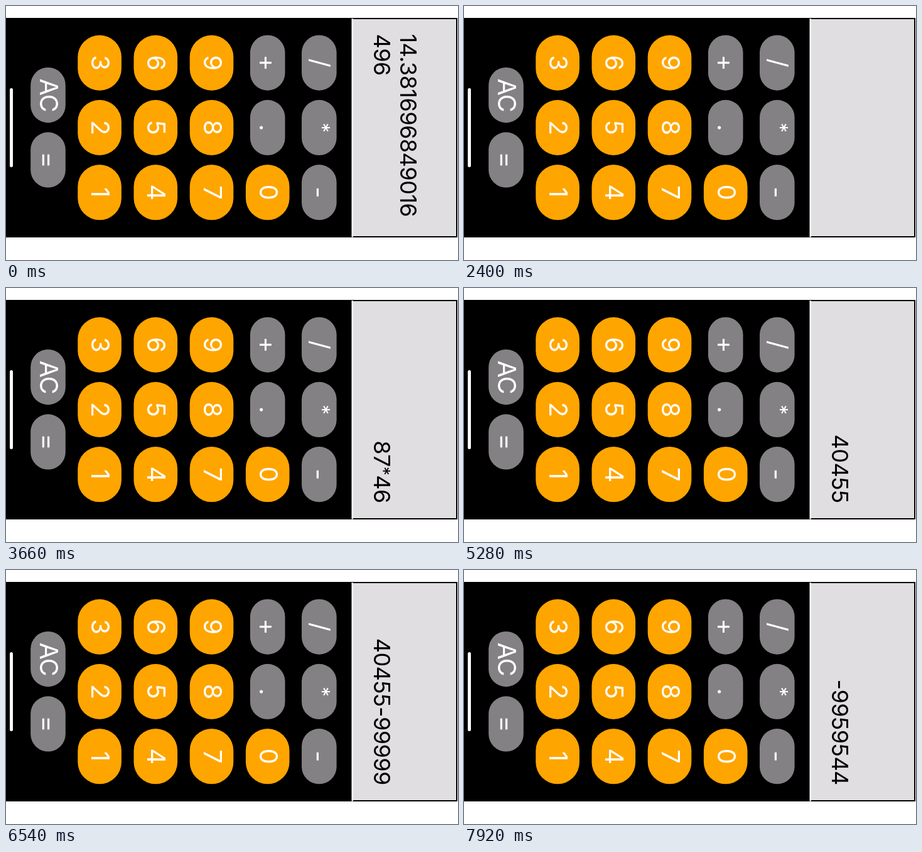
Animation of 720 by 405 pixels, one loop 8 s. Source, as an HTML page:

```html
<!DOCTYPE html>
<html lang="en">
<head>
<meta charset="utf-8">
<title>Calculator</title>
<style>
  html, body { margin: 0; width: 100%; height: 100%; overflow: hidden; background: #fff; }
  svg { display: block; width: 720px; height: 405px; }
  text { font-family: Inter, "Liberation Sans", sans-serif; white-space: pre; }
  #keys text { font-size: 40px; fill: #fff; text-anchor: middle; }
  #screen { font-size: 36px; letter-spacing: -0.55px; fill: #000; }
</style>
</head>
<body>
<svg viewBox="0 0 720 405">
  <rect y="19" width="719" height="350"/>
  <rect x="550.5" y="20" width="2.5" height="348.5" fill="#fff"/>
  <rect x="553" y="21" width="164" height="346" fill="#e0dee1"/>
  <rect x="6" y="131" width="5" height="126" rx="2.5" fill="#fff"/>
  <g id="keys"></g>
  <g id="screen"></g>
</svg>
<script>
const LOOP = 8000;
const ORANGE = { fill: '#ffa500', width: 69.6 };
const GRAY = { fill: '#848184', width: 55.6 };

// Each row of keys: centre x, style, top of the first key, labels from top to bottom
const rows = [
  [67, GRAY, 98, 'AC', '='],
  [149.1, ORANGE, 46.5, '3', '2', '1'],
  [238.3, ORANGE, 46.5, '6', '5', '4'],
  [327.5, ORANGE, 46.5, '9', '8', '7'],
  [416.7, GRAY, 46.5, '+', '.'],
  [416.7, ORANGE, 253.1, '0'],
  [498.8, GRAY, 46.5, '/', '*', '-'],
];

const KEY_HEIGHT = 88.2, KEY_STEP = 103.3;

function key(cx, { fill, width }, y, label) {
  const star = label === '*';
  const base = cx - 13 + (star ? 6 : '+-='.includes(label) ? -2 : 0);
  const style = star ? 'font-size:32px' : label === 'AC' ? 'letter-spacing:-1px' : '';
  return `<rect x="${cx - width / 2}" y="${y}" width="${width}" height="${KEY_HEIGHT}" rx="${width / 2}" fill="${fill}"/>
    <text transform="translate(${base} ${y + KEY_HEIGHT / 2}) rotate(90)" style="${style}">${label}</text>`;
}

document.getElementById('keys').innerHTML = rows.map(([cx, style, top, ...labels]) =>
  labels.map((label, i) => key(cx, style, top + i * KEY_STEP, label)).join('')).join('');

// What the display reads from each time on
const steps = [
  [0, '14.381696849016\n496'],
  [1860, ''],
  [2820, '8'], [3030, '87'], [3210, '87*'], [3390, '87*4'], [3570, '87*46'], [3870, '87*465'],
  [4500, '40455'], [5340, '40455-'],
];
for (let n = 1; n <= 7; n++) steps.push([5760 + n * 150, '40455-' + '9'.repeat(n)]);
steps.push([7230, '-9959544']);

const line = (x, y, anchor, text) =>
  `<text transform="translate(${x} ${y}) rotate(90)" text-anchor="${anchor}">${text}</text>`;

// The asterisk is smaller and raised
const raiseStar = text => text.replace(/\*(.*)/,
  '<tspan font-size="28" dy="-5.8">*</tspan><tspan dy="5.8">$1</tspan>');

function render(value) {
  const [first, second] = value.split('\n');
  return second
    ? line(628, 44.5, 'start', first) + line(585.5, 44.5, 'start', second)
    : line(585.5, 342.8, 'end', raiseStar(first));
}

const screen = document.getElementById('screen');
let shown = null;

function frame() {
  const t = performance.now() % LOOP;
  const value = steps.filter(([at]) => at <= t).pop()[1];
  if (value !== shown) screen.innerHTML = render(shown = value);
  requestAnimationFrame(frame);
}
frame();
</script>
</body>
</html>
```
